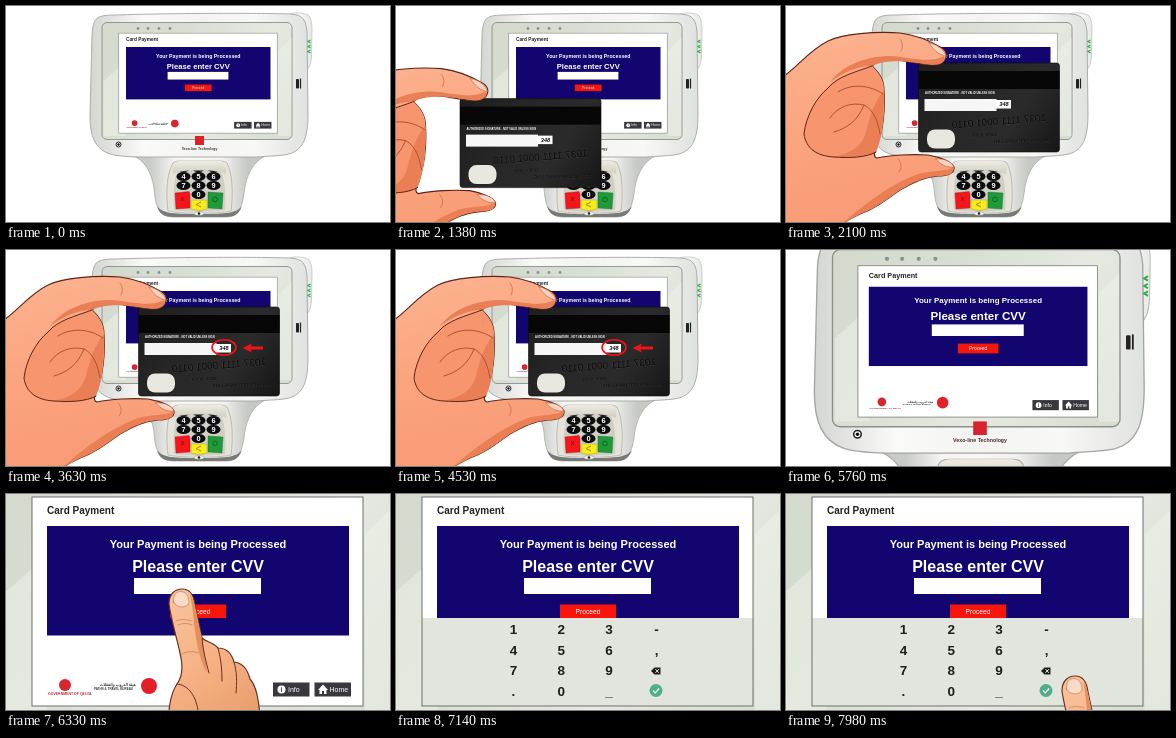
Animation of 384 by 216 pixels, one loop 8000 ms. Source, as an HTML page with a canvas:

```html
<!DOCTYPE html>
<html lang="en">
<head>
<meta charset="utf-8">
<title>Card payment</title>
<style>
html, body { margin: 0; width: 100%; height: 100%; overflow: hidden; background: #fff; }
canvas { display: block; width: 384px; height: 216px; }
</style>
</head>
<body>
<canvas id="stage"></canvas>
<script>
const W = 384, H = 216, LOOP = 8000;
const ZOOM = { s: 2.09, x: -209.8, y: -53.7 };
const SANS = '"Liberation Sans", Arial, sans-serif';
const SKIN = '#f5b183', SHADE = '#e3905f', LINE = '#6b3020';
const GRIP = '#fba47e', GRIP_SHADE = '#ea7f55', GRIP_LINE = '#5c2415';

const canvas = document.getElementById('stage');
const ratio = Math.max(1, window.devicePixelRatio || 1);
canvas.width = W * ratio;
canvas.height = H * ratio;
const c = canvas.getContext('2d');

const span = (t, a, b) => Math.min(1, Math.max(0, (t - a) / (b - a)));
const easeOut = u => 1 - (1 - u) * (1 - u);
const easeIn = u => u * u;
const smooth = u => u * u * (3 - 2 * u);
const mix = (a, b, u) => a + (b - a) * u;

function rect(x, y, w, h, fill) {
  c.fillStyle = fill;
  c.fillRect(x, y, w, h);
}

function round(x, y, w, h, r, fill, stroke, width = 1) {
  c.beginPath();
  c.roundRect(x, y, w, h, r);
  paint(fill, stroke, width);
}

function oval(x, y, rx, ry, fill, stroke, width = 1) {
  c.beginPath();
  c.ellipse(x, y, rx, ry, 0, 0, Math.PI * 2);
  paint(fill, stroke, width);
}

function shape(d, fill, stroke, width = 1) {
  const p = new Path2D(d);
  if (fill) { c.fillStyle = fill; c.fill(p); }
  if (stroke) { c.strokeStyle = stroke; c.lineWidth = width; c.stroke(p); }
}

function paint(fill, stroke, width) {
  if (fill) { c.fillStyle = fill; c.fill(); }
  if (stroke) { c.strokeStyle = stroke; c.lineWidth = width; c.stroke(); }
}

function text(s, x, y, size, fill, align = 'left', style = 'bold') {
  c.font = `${style} ${size}px ${SANS}`;
  c.textAlign = align;
  c.fillStyle = fill;
  c.fillText(s, x, y);
}

function blend(x0, y0, x1, y1, ...colors) {
  const g = c.createLinearGradient(x0, y0, x1, y1);
  colors.forEach((k, i) => g.addColorStop(i / (colors.length - 1), k));
  return g;
}

function at(x, y, draw) {
  c.save();
  c.translate(x, y);
  draw();
  c.restore();
}

function drawHandle() {
  shape('M284 8C290 6 298 7 302 9C305 11 306 17 306 24L305.500 50C305 58 303 63 299 66L292 20Z',
    blend(290, 0, 307, 0, '#fbfbfa', '#e6e8e5'), '#b9bcb8', 0.7);
}

function drawPad() {
  shape('M124 149C137 152 145 164 148 182C149 196 151 211 168 211L220 211C234 211 237 197 238.500 184C241 166 250 152 263 149Z',
    blend(144, 0, 242, 0, '#c9cbc7', '#f5f5f3', '#f8f8f6', '#f1f1ef', '#c6c8c4'), '#a8aba6', 0.8);
  shape('M151 200C156 207 165 208 193 208C221 208 231 207 236 200C233 208 229 211 220 211L168 211C158 211 153 208 151 200Z', '#777a76');
  shape('M162 205C160 190 160 168 167 157Q169 155 173 155L215 155Q219 155 221 157C227 168 227 190 225 205C213 208 174 208 162 205Z',
    '#e6e3d9', '#a9aba3', 0.7);
  shape('M168 204C167 186 168 170 173 163L213 163C219 170 220 186 219 204C209 206 178 206 168 204Z', '#cfcfc6');
  const digits = ['123', '456', '789', ' 0 '];
  digits.forEach((row, r) => [...row].forEach((d, i) => {
    if (d === ' ') return;
    const x = 177.5 + i * 15, y = 161.5 + r * 9;
    oval(x, y, 7, 4.5, '#0c0c0e');
    text(d, x, y + 2.6, 7.4, '#fff', 'center');
  }));
  shape('M169 187L183 185.500L184 188L184 202L170 203Z', '#f5151b', '#8d171c', 0.4);
  shape('M185 194L201 194L201 203Q193 206 185 203Z', '#f8ec1a', '#9d941b', 0.4);
  shape('M202 186L217 187L216 203L202 202Z', '#1f9a38', '#17692a', 0.4);
  shape('M175 191L178 195M178 191L175 195', null, '#7c1014', 0.8);
  shape('M195 196L190 198.500L195 201', null, '#9a7d10', 0.9);
  oval(209, 193.5, 2.3, 2.3, null, '#0f5a22', 0.8);
  shape('M167 168C166 160 168 156 173 155L215 155C220 156 221 160 220 168C214 165 207 164.500 193.500 164.500C180 164.500 173 165 167 168Z',
    blend(0, 154, 0, 168, '#f1eee5', '#cfccc1'));
  oval(193, 207.5, 5, 1.8, '#fff', '#777', 0.5);
  oval(193, 207.5, 1.3, 1.2, '#222');
}

function drawTerminal(slide) {
  drawHandle();
  drawPad();
  shape('M88 17C90 10 97 9 110 9C170 7 260 7 285 8C297 9 300 14 301 26L302 108C302 132 297 144 283 148C275 150 262 150 250 151L146 151C130 151 115 151 104 148C89 143 84 130 84 110L86 30C86 25 87 20 88 17Z',
    blend(83, 0, 303, 0, '#d3d5d1', '#fafaf9', '#f3f3f1', '#f8f8f7', '#dfe1de'), '#a3a6a1', 0.9);
  for (let y = 34; y < 46; y += 5) {
    shape(`M304.500 ${y}L302 ${y + 1.5}L304.500 ${y + 3}`, null, '#2fae4a', 1.3);
  }
  round(96, 16.5, 190, 117, 5, blend(97, 20, 270, 140, '#d3d9cd', '#d9ded4', '#e5e9e1', '#d8ddd2'), '#8b908a', 0.9);
  shape('M97.500 75L120 55L120 130L97.500 130Z', 'rgba(240,244,236,.5)');
  shape('M272 45L285.500 32L285.500 130L272 130Z', 'rgba(240,244,236,.45)');
  for (const x of [132, 142, 153, 164]) oval(x, 22.5, 1.4, 1.4, '#8d928c');
  oval(112.5, 138.5, 2.5, 2.5, '#fff', '#222', 1);
  oval(112.5, 138.5, 1.2, 1.2, '#111');
  round(290, 73, 3, 9.5, 0.8, '#222');
  shape('M294.500 72.500L294.500 82.500', null, '#222', 1.2);
  rect(189, 130, 9, 9, '#d8232b');
  text('Vexo-line Technology', 193.5, 143.5, 3.5, '#4a3030', 'center');
  c.save();
  c.translate(-ZOOM.x / ZOOM.s, -ZOOM.y / ZOOM.s);
  c.scale(1 / ZOOM.s, 1 / ZOOM.s);
  drawScreen(slide);
  c.restore();
}

function drawButton(x, label) {
  rect(x, 188.5, 36.5, 14, '#38383d');
  text(label, x + 15, 198, 7, '#fff', 'left', 'normal');
}

function drawScreen(slide) {
  rect(26, 3, 331, 209, '#fff');
  text('Card Payment', 41, 20, 10, '#222');
  rect(41, 32, 302, 109.5, '#12056f');
  text('Your Payment is being Processed', 192, 54, 11, '#fff', 'center');
  text('Please enter CVV', 192, 78.5, 16, '#fff', 'center');
  rect(128, 84, 127, 16, '#fff');
  rect(164, 110.5, 56, 13.5, '#f8160c');
  text('Proceed', 192, 119.8, 6.7, '#fff', 'center', 'normal');

  oval(59, 191, 6, 6, '#d8262d');
  text('GOVERNMENT OF QELVA', 42, 201, 3.5, '#b8323a');
  text('هيئة الدروب والتنقلات', 124, 192, 4, '#333', 'right');
  text('PATHS & TRAVEL BUREAU', 88, 196, 3, '#333');
  oval(143, 192, 8, 8, '#e3202a');

  drawButton(267, 'Info');
  oval(275.5, 195.5, 4, 4, '#fff');
  text('i', 275.5, 198, 6.5, '#38383d', 'center');
  drawButton(308.5, 'Home');
  shape('M312 196L317 190.500L322 196L320.500 196L320.500 200L318 200L318 197L316 197L316 200L313.500 200L313.500 196Z', '#fff');

  if (slide > 0) drawKeys(slide);
  c.strokeStyle = '#6c716b';
  c.lineWidth = 1;
  c.strokeRect(26, 3, 331, 209);
}

function drawKeys(slide) {
  c.save();
  c.beginPath();
  c.rect(26, 3, 331, 209);
  c.clip();
  c.translate(0, 89 * (1 - slide));
  rect(26, 124, 331, 89, '#e1e5de');
  ['123-', '456,', '789 ', '.0_ '].forEach((row, r) => [...row].forEach((k, i) => {
    text(k, 117.5 + i * 47.7, 140 + r * 20.7, 13.5, '#1d1f1d', 'center');
  }));
  shape('M255 177L258.500 173.500L264.500 173.500L264.500 180.500L258.500 180.500Z', '#1d1f1d');
  shape('M259.500 175.200L262.800 178.800M262.800 175.200L259.500 178.800', null, '#fff', 0.9);
  oval(260, 196.5, 6.5, 6.5, '#4fae8b');
  shape('M257 196.600L259.200 198.800L263.200 194.500', null, '#fff', 1.2);
  c.restore();
}

function mirrored(s, x, y, size, tilt) {
  c.save();
  c.translate(x, y);
  c.rotate(tilt);
  c.scale(-1, 1);
  text(s, 0.4, 0.4, size, '#454545', 'left', 'normal');
  text(s, 0, 0, size, '#0a0a0a', 'left', 'normal');
  c.restore();
}

function drawCard(marked) {
  round(132.5, 57, 141, 89, 3, blend(133, 57, 273, 146, '#1d1d1d', '#262626', '#2b2b2b', '#161616'), '#0b0b0b', 0.6);
  rect(132.5, 65, 141, 18, '#070707');
  text('AUTHORIZED SIGNATURE - NOT VALID UNLESS SIGN', 139, 88.3, 2.7, '#fff');
  rect(138.5, 93, 72, 12, '#f6f6f6');
  rect(210, 94, 15, 8.5, '#fff');
  text('348', 218, 100.2, 5.6, '#111', 'center', 'italic bold');
  mirrored('1037 1111 0001 0110', 260, 115, 10, -0.08);
  mirrored('10/00  00/00', 211, 130, 4.5, -0.04);
  mirrored('CARD HOLDER NAME LINE', 266, 136, 4.6, -0.02);
  round(141, 123.5, 28, 19, 8, '#e9e8e0');
  if (marked) {
    oval(218, 97.5, 12, 7.8, null, '#f0141a', 1.6);
    shape('M257 96.500L244.500 96.500L246 93.500L236.500 98L246 102.500L244.500 99.500L257 99.500Z', '#f0141a');
  }
}

function drawGrip() {
  c.lineJoin = c.lineCap = 'round';
  shape('M-2 70C12 60 24 44 42 35C56 28 90 25 114 27C130 29 146 36 156 42C162 46 162 54 154 58C146 61 132 57 118 55C104 53 92 54 86 60C91 65 98 72 98 84C99 100 98 118 93 134C91 143 85 150 91 152C104 149 126 148 142 149C154 151 166 156 168 161C169 167 162 170 152 170C138 171 128 176 114 184C100 194 90 202 74 208C68 211 60 215 55 219L-2 219Z',
    blend(20, 40, 60, 216, '#fcb08d', GRIP, '#f89b76'), GRIP_LINE, 1.1);
  shape('M86 60C70 66 52 70 42 82C30 92 20 110 18 128C20 142 30 150 48 151C62 152 80 152 90 146C97 130 99 104 98 84C98 72 91 65 86 60Z', '#f7956e');
  shape('M98 84C98 104 97 130 90 146C80 152 62 152 48 151C66 147 76 140 80 126C84 110 88 96 98 84Z', GRIP_SHADE);
  shape('M86 60C72 60 58 66 44 76C58 58 82 50 104 50C124 51 144 58 158 50C161 56 154 59 146 59C132 57 104 51 86 60Z', GRIP_SHADE);
  shape('M55 219C76 200 104 178 132 168C146 164 160 166 168 161C168 168 162 170 152 170C138 171 128 176 114 184C100 194 90 202 74 208Z', GRIP_SHADE);
  shape('M86 60C70 66 52 70 42 82C30 92 20 110 18 128C20 142 30 150 48 151C62 152 80 152 90 146', null, GRIP_LINE, 1);
  shape('M52 86C66 77 84 79 97 88M44 112C52 100 66 96 78 99C88 104 92 116 94 128M78 99C72 114 62 122 48 126', null, '#a84c2c', 0.9);
  shape('M114 33C117 37 117 41 115 45M112 153C116 157 116 162 113 166', null, '#c96540', 0.7);
  shape('M143 37C150 38 158 43 160 50C153 49 147 44 143 37Z', '#fdd3c0', '#b8603f', 0.6);
  shape('M150 153C158 152 166 156 168 161C160 162 154 158 150 153Z', '#fdd3c0', '#b8603f', 0.6);
}

function drawPointer() {
  c.lineJoin = c.lineCap = 'round';
  shape('M-13 15C-13 5 -7 0 0 0C8 0 12 7 13 16L20 49C24 53 31 53 36 59C45 59 50 66 52 73C61 74 66 82 68 90C74 97 78 109 79 150L-14 150C-14 119 -12 106 -5 95C1 87 1 76 -2 64C-6 46 -11 30 -13 15Z',
    blend(-14, 20, 70, 130, '#f9c199', SKIN, '#ea9d6d'), LINE, 1.2);
  shape('M8 5C14 13 14 26 20 49C22 61 24 70 25 84C17 70 14 51 12 34C11 24 10 15 8 5Z', SHADE);
  shape('M20 49C21 62 24 73 27 84M36 59C39 70 40 80 40 92M52 73C55 83 55 94 54 104', null, LINE, 1);
  shape('M-5 95C5 96 13 104 16 121', null, LINE, 1);
  shape('M-6 32C-2 30 5 30 9 32M-4 36C0 34 6 34 10 36M0 65C5 62 12 62 16 64', null, '#c47b52', 0.7);
  shape('M-8.500 13C-9 5 -5 2.500 -1 2.500C4 3 7 7 7 14C5 19 -5 20 -8.500 13Z', '#fbdac8', '#b86f4c', 0.6);
}

function gripPlace(t) {
  if (t < 840 || t > 5560) return null;
  const rest = 1 - easeOut(span(t, 840, 1920));
  const out = easeIn(span(t, 5130, 5560));
  return [-275 * rest - 280 * out, 143 * rest];
}

function pointerPlace(t) {
  if (t < 5980) return null;
  if (t < 6620) {
    const u = easeOut(span(t, 5980, 6300));
    return [mix(205, 176, u), mix(224, 95, u)];
  }
  if (t < 7740) {
    const u = smooth(span(t, 6620, 7080));
    return [mix(176, 215, u), mix(95, 224, u)];
  }
  const u = span(t, 7740, 7980);
  return [mix(306, 289, u), mix(222, 182, u)];
}

function render(t) {
  c.setTransform(ratio, 0, 0, ratio, 0, 0);
  rect(0, 0, W, H, '#fff');
  const k = smooth(span(t, 5540, 6000));
  const s = mix(1, ZOOM.s, k);
  c.save();
  c.translate(ZOOM.x * k, ZOOM.y * k);
  c.scale(s, s);
  drawTerminal(easeOut(span(t, 6560, 6920)));
  c.restore();

  const grip = gripPlace(t);
  if (grip) at(...grip, () => {
    drawCard(t >= 3300 && t < 4900);
    drawGrip();
  });
  const pointer = pointerPlace(t);
  if (pointer) at(...pointer, drawPointer);
}

function tick(now) {
  render(now % LOOP);
  requestAnimationFrame(tick);
}
render(0);
requestAnimationFrame(tick);
</script>
</body>
</html>
```
